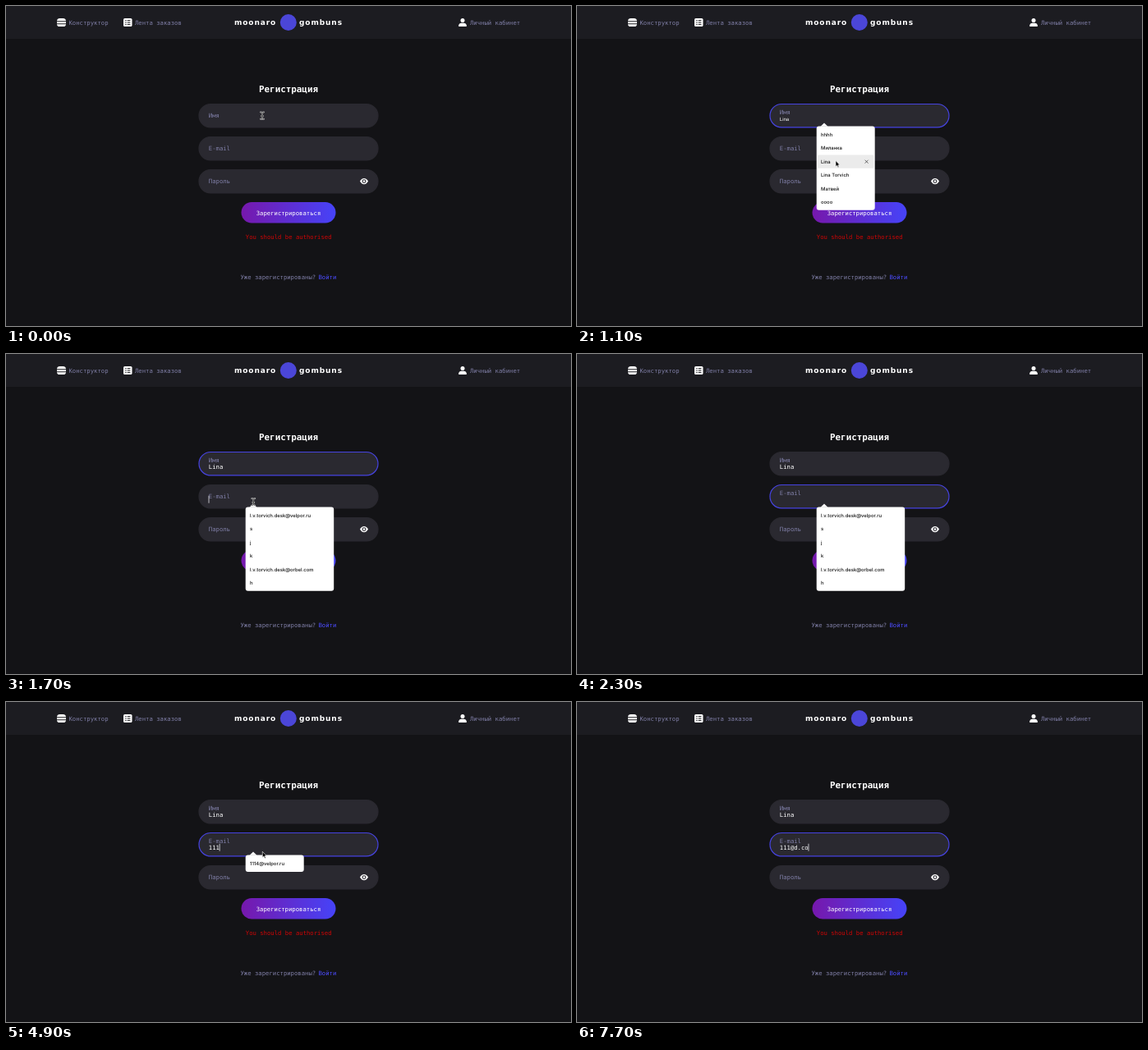
These frames come from a looping animation (688x390 px, 8000 ms). An HTML page:

```html
<!DOCTYPE html>
<html lang="ru">
<head>
<meta charset="utf-8">
<title>Регистрация</title>
<style>
  html, body { margin: 0; width: 100%; height: 100%; overflow: hidden; background: #131316; }
  svg { display: block; width: 688px; height: 390px; }
  text { font: 7.26px "DejaVu Sans Mono", monospace; text-rendering: geometricPrecision; white-space: pre; }
  .muted { fill: #7f7ea6; }
  .white { fill: #fff; }
  .title { font-size: 10.88px; font-weight: 700; }
  .brand { font: 700 9px "DejaVu Sans", sans-serif; letter-spacing: .9px; }
  .preview { font: 6px "Liberation Sans", sans-serif; }
  .item { font: 500 5.9px Inter, sans-serif; fill: #111; }
  .field { fill: #2a2930; stroke-width: 1.2; }
</style>
</head>
<body>
<svg viewBox="0 0 688 390">
  <defs>
    <linearGradient id="violet">
      <stop offset="0" stop-color="#7618ac"/>
      <stop offset="1" stop-color="#4643f8"/>
    </linearGradient>
  </defs>

  <rect width="688" height="390" fill="#131316"/>
  <rect width="688" height="40" fill="#1c1c21"/>
  <g fill="#fff">
    <path d="M62 18.2Q62.4 15 65.5 15H69.5Q72.6 15 73 18.2ZM62 19.2H73V21.2H62ZM62 22.2H73Q72.8 25 70 25H65Q62.2 25 62 22.2Z"/>
    <rect x="143" y="15" width="10.5" height="10" rx="1.6"/>
    <circle cx="556" cy="17.4" r="2.5"/>
    <path d="M551.2 25V23.3Q551.6 20.8 554.3 20.8H557.7Q560.4 20.8 560.8 23.3V25Z"/>
  </g>
  <path d="M145.2 17.6H146.6M147.7 17.6H151.4M145.2 20H146.6M147.7 20H151.4M145.2 22.4H146.6M147.7 22.4H151.4" stroke="#1c1c21"/>
  <text class="muted" x="76.5" y="22.6">Конструктор</text>
  <text class="muted" x="157" y="22.6">Лента заказов</text>
  <text class="muted" x="565" y="22.6">Личный кабинет</text>
  <text class="white brand" x="278" y="22.6">moonaro</text>
  <circle cx="343.8" cy="20" r="10" fill="#4b46d8"/>
  <text class="white brand" x="357" y="22.6">gombuns</text>

  <text class="white title" x="344" y="105" text-anchor="middle">Регистрация</text>
  <g id="form"></g>
  <g transform="translate(436 213.6)">
    <path d="M-5 0Q-3.2-3.6 0-3.6T5 0Q3.2 3.6 0 3.6T-5 0Z" fill="#fff"/>
    <circle r="1.9" fill="#fff" stroke="#2a2930" stroke-width="1.1"/>
  </g>
  <rect x="286.5" y="239" width="115" height="25.5" rx="12.75" fill="url(#violet)"/>
  <text class="white" x="344" y="254.6" text-anchor="middle">Зарегистрироваться</text>
  <text x="291.8" y="283.6" fill="#cf0505">You should be authorised</text>
  <text class="muted" x="285.5" y="332.6">Уже зарегистрированы?</text>
  <text x="380.5" y="332.6" fill="#4c4cff">Войти</text>

  <rect id="caret" width=".8" height="9" fill="#e6e6ee"/>
  <g id="list"></g>
  <g id="beam" fill="none" stroke-linecap="round">
    <path d="M-2-4.2Q0-4.2 0-3V3Q0 4.2-2 4.2M2-4.2Q0-4.2 0-3V3Q0 4.2 2 4.2M-1 .5H1" stroke="#ddd" stroke-width="1.7"/>
    <path d="M-2-4.2Q0-4.2 0-3V3Q0 4.2-2 4.2M2-4.2Q0-4.2 0-3V3Q0 4.2 2 4.2M-1 .5H1" stroke="#222" stroke-width=".6"/>
  </g>
  <path id="arrow" d="M0 0V7.2L1.7 5.7 2.8 8.2 4 7.7 2.9 5.3H5Z" fill="#000" stroke="#fff" stroke-width=".6"/>
</svg>

<script>
const LOOP = 8000, STEP = 100, ADVANCE = 4.37, PITCH = 16.35, LEFT = 246.8;
const $ = id => document.getElementById(id);
const clamp = v => Math.min(1, Math.max(0, v));
const current = (table, t) => table.filter(row => row[0] <= t).pop();

function add(parent, tag, attrs, text = '') {
  const el = document.createElementNS('http://www.w3.org/2000/svg', tag);
  for (const key in attrs) el.setAttribute(key, attrs[key]);
  el.textContent = text;
  return parent.appendChild(el);
}
const show = (el, on) => el.setAttribute('display', on ? 'inline' : 'none');

const NAMES = ['hhhh', 'Миланка', 'Lina', 'Lina Torvich', 'Матвей', 'oooo'];
const MAILS = ['l.v.torvich.desk@velpor.ru', 's', 'j', 'k', 'l.v.torvich.desk@orbel.com', 'h'];

// time, items, top, width
const LISTS = [
  [0, [], 0, 0],
  [100, NAMES, 146.5, 71],
  [1200, [], 0, 0],
  [1700, MAILS, 186.5, 107.5],
  [2400, ['1114@velpor.ru', '1', '11'], 186.5, 71],
  [2700, ['1114@velpor.ru'], 186.5, 71],
  [5000, [], 0, 0]
];

// time, pointer kind, x, y
const POINTER = [
  [0, 'beam', 312, 133.5],
  [300, 'beam', 312, 139],
  [400, 'arrow', 313, 150],
  [500, 'arrow', 314, 162],
  [600, 'arrow', 314, 172],
  [700, 'arrow', 315, 181],
  [800, 'arrow', 315, 186],
  [900, 'arrow', 315, 188.5],
  [1400, 'arrow', 307, 184],
  [1500, 'beam', 301.3, 180.3],
  [2300, '', 0, 0],
  [3500, 'beam', 302, 180],
  [3600, 'arrow', 306, 181],
  [3700, 'arrow', 310, 182],
  [3800, 'arrow', 312.3, 182.3],
  [5000, '', 0, 0]
];

// time, typed address
const TYPED = [
  [1700, ''], [2400, '1'], [2600, '11'], [2900, '111'], [5000, '111@'],
  [6000, '111@d'], [6600, '111@d.'], [7600, '111@d.c'], [7700, '111@d.co']
];

function makeField(label, top) {
  const form = $('form');
  return {
    mid: top + 17.1,
    box: add(form, 'rect', { class: 'field', x: 235, y: top + .5, width: 218, height: 28.4, rx: 14.2 }),
    label: add(form, 'text', { class: 'muted', x: LEFT }, label),
    value: add(form, 'text', { class: 'white', x: LEFT, y: top + 20.8 })
  };
}
const [nameField, mailField, passField] =
  [['Имя', 119], ['E-mail', 159], ['Пароль', 199]].map(args => makeField(...args));

function setField(field, lift, focus, text, preview) {
  field.label.setAttribute('y', field.mid - 4.5 * lift);
  field.box.setAttribute('stroke', focus ? '#4643e0' : '#2a2930');
  field.value.textContent = text;
  field.value.setAttribute('class', preview ? 'white preview' : 'white');
}

function drawList(items, top, width, hover) {
  const list = $('list');
  list.replaceChildren();
  if (!items.length) return;
  const height = items.length * PITCH + 4.2;
  add(list, 'path', { d: `M296.5 ${top + .2}L301 ${top - 4}L305.5 ${top + .2}Z`, fill: '#fff' });
  add(list, 'rect', { x: 291.7, y: top, width, height, rx: 3, fill: '#fff' });
  items.forEach((item, i) => {
    const y = top + 10.5 + i * PITCH;
    if (i === hover) {
      add(list, 'rect', { x: 293, y: y - 8.2, width: width - 2.6, height: PITCH, rx: 1.5, fill: '#ebebeb' });
      add(list, 'path', { d: `M350.6 ${y - 2}l4 4m0-4l-4 4`, stroke: '#333', 'stroke-width': .7 });
    }
    add(list, 'text', { class: 'item', x: 297, y: y + 2.1 }, item);
  });
}

function drawCaret(t) {
  const inMail = t >= 1700;
  const [since, text] = inMail ? current(TYPED, t)
    : t >= 1200 ? [1200, 'Lina'] : [100, ''];
  const on = t >= 100 && Math.floor((t - since) / 500) % 2 === 0;
  show($('caret'), on && (inMail || t >= 1200 || t < 400));
  $('caret').setAttribute('x', LEFT - .2 + text.length * ADVANCE);
  $('caret').setAttribute('y', inMail ? 172.7 : 132.7);
}

function draw(t) {
  const [, kind, x, y] = current(POINTER, t);
  const [, items, top, width] = current(LISTS, t);
  const hovering = items === NAMES && kind === 'arrow';
  const hover = hovering ? Math.floor((y - top - 2) / PITCH) : -1;

  const nameText = t >= 1200 ? 'Lina' : NAMES[hover] || '';
  const mailText = t >= 1700 ? current(TYPED, t)[1] : '';
  setField(nameField, clamp((t - 80) / 180), t >= 200 && t < 1800, nameText, t < 1200);
  setField(mailField, clamp((t - 1680) / 180), t >= 1800, mailText);
  setField(passField, 0, false, '');

  drawList(items, top, width, hover);
  drawCaret(t);
  for (const id of ['beam', 'arrow']) {
    show($(id), id === kind);
    $(id).setAttribute('transform', `translate(${x} ${y})`);
  }
}

const start = performance.now();
let last = -1;
function tick() {
  const t = Math.floor((performance.now() - start) % LOOP / STEP) * STEP;
  if (t !== last) draw(last = t);
  requestAnimationFrame(tick);
}
tick();
</script>
</body>
</html>
```
